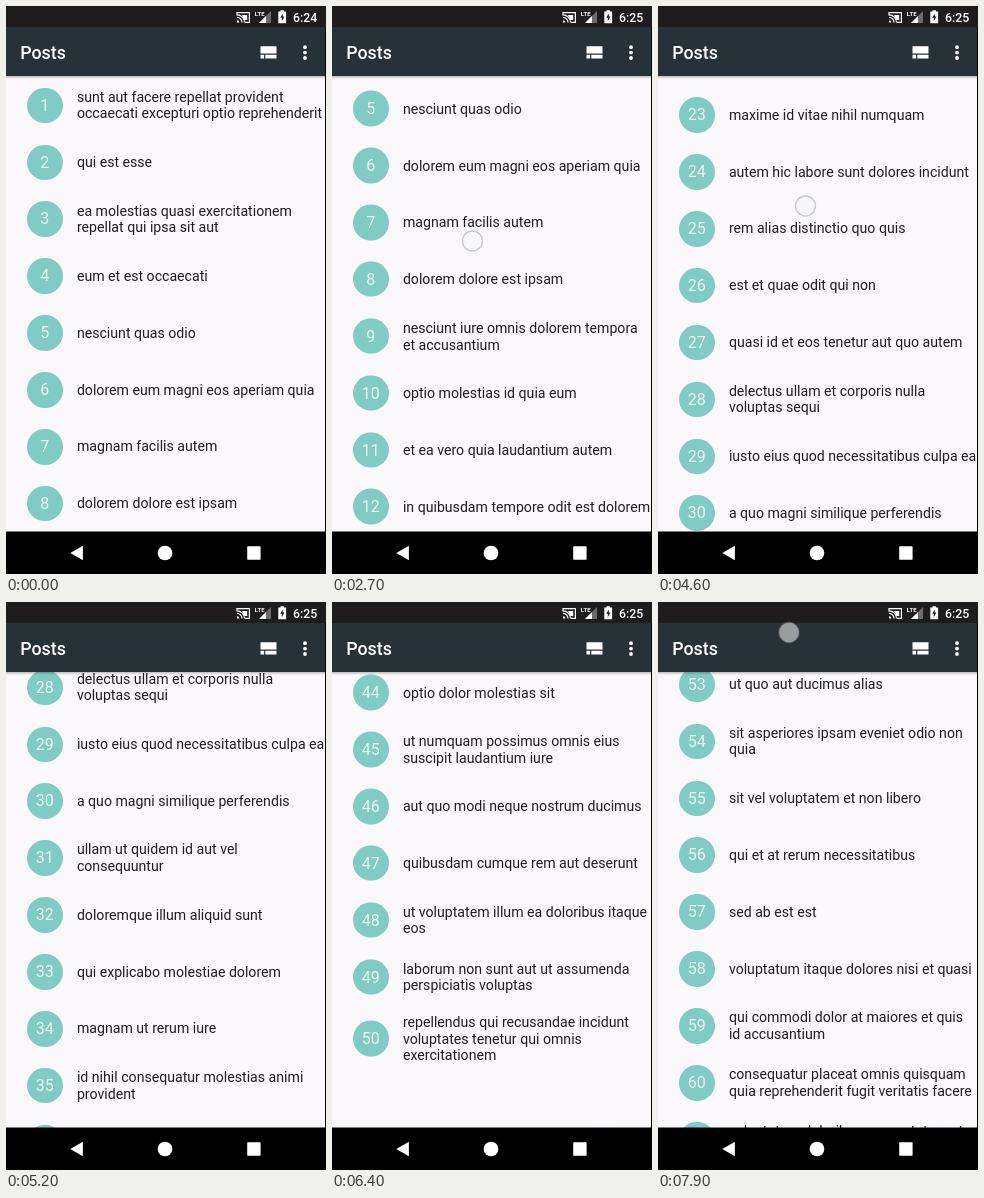
An HTML page that plays this animation: 320 px wide and 568 px high, repeating every 8000 ms.

```html
<!DOCTYPE html>
<html lang="la">
<head>
<meta charset="utf-8">
<title>Posts</title>
<style>
  html, body { margin: 0; width: 100%; height: 100%; overflow: hidden; background: #000; }
  #stage { position: relative; width: 320px; height: 568px; overflow: hidden; font-family: Roboto, sans-serif; }
  #view { position: absolute; top: 70px; width: 319px; height: 455.5px; overflow: hidden; background: #faf8fb; }
  #list { position: absolute; left: 0; top: 1px; width: 320px; }
  .row { position: absolute; left: 0; width: 320px; display: flex; align-items: center; }
  .badge { position: absolute; left: 21px; width: 35.6px; height: 35.6px; border-radius: 50%;
    background: #80cbc4; color: #e8f6f4; font-size: 16px; line-height: 35.6px; text-align: center; }
  .label { position: absolute; left: 70.9px; white-space: pre; font-size: 14.14px; line-height: 16.67px; color: #1e1e1e; }
  svg { position: absolute; left: 0; top: 0; }
</style>
</head>
<body>
<div id="stage">
  <div id="view"><div id="list"></div></div>
  <svg width="320" height="568" viewBox="0 0 320 568">
    <defs>
      <linearGradient id="shade" x1="0" y1="0" x2="0" y2="1">
        <stop offset="0" stop-color="#000" stop-opacity=".25"/>
        <stop offset="1" stop-color="#000" stop-opacity="0"/>
      </linearGradient>
    </defs>
    <path id="spinner" fill="none" stroke="#80cbc4" stroke-width="3.4"/>
    <path id="glow" fill="#000" fill-opacity=".14"/>
    <rect y="70" width="319" height="3" fill="url(#shade)"/>
    <rect width="320" height="21" fill="#1f1c1e"/>
    <rect y="21" width="319" height="49" fill="#263238"/>
    <rect y="525.5" width="320" height="43" fill="#000"/>
    <g fill="#fff">
      <text x="14.2" y="53.2" font-size="17.78" font-weight="500">Posts</text>
      <path d="M254.5 40.3h16v7.3h-16zM254.5 48.8h3.6v3.6h-3.6zM259.3 48.8h11.2v3.6h-11.2z"/>
      <circle cx="299" cy="41.2" r="1.9"/><circle cx="299" cy="46.6" r="1.9"/><circle cx="299" cy="52" r="1.9"/>
      <text id="clock" x="287" y="15.6" font-size="12.3" font-weight="500"></text>
      <g fill="none" stroke="#fff" stroke-width="1.2">
        <path d="M231 9.5V6.6h12.4v9.8H239M231 11.4a5 5 0 0 1 5 5M231 8.9a7.5 7.5 0 0 1 7.5 7.5"/>
      </g>
      <path d="M231 14.2a2.4 2.4 0 0 1 2.4 2.4H231zM236 9h5.2v5h-3z"/>
      <text x="248.8" y="10.2" font-size="6" font-weight="700">LTE</text>
      <path d="M265 5v12H253z" fill-opacity=".35"/>
      <path d="M260 10v7h-7z"/>
      <path d="M272.3 5.6h2.2V4.2h3.4v1.4h2.2v11.6h-7.8z"/>
      <path d="M276.8 7.4l-2.6 4.4h1.6v3.4l2.6-4.6h-1.6z" fill="#1f1c1e"/>
      <path d="M64.3 547l12.6-7.2v14.4z"/>
      <circle cx="159" cy="547" r="7.3"/>
      <rect x="241.2" y="540.3" width="13.4" height="13.4" rx=".6"/>
    </g>
    <circle id="touch" r="10" stroke-width="1.4"/>
  </svg>
</div>
<script>
const titles = `sunt aut facere repellat provident/occaecati excepturi optio reprehenderit
qui est esse
ea molestias quasi exercitationem/repellat qui ipsa sit aut
eum et est occaecati
nesciunt quas odio
dolorem eum magni eos aperiam quia
magnam facilis autem
dolorem dolore est ipsam
nesciunt iure omnis dolorem tempora/et accusantium
optio molestias id quia eum
et ea vero quia laudantium autem
in quibusdam tempore odit est dolorem
dolorum ut in voluptas mollitia et/saepe quo animi
voluptatem eligendi optio
eveniet quod temporibus
sint suscipit perspiciatis velit/dolorum rerum ipsa laboriosam odio
fugit voluptas sed molestias/voluptatem provident
voluptate et itaque vero tempora/molestiae
adipisci placeat illum aut reiciendis qui
doloribus ad provident suscipit at
asperiores ea ipsam voluptatibus modi/minima quia sint
dolor sint quo a velit explicabo quia/nam
maxime id vitae nihil numquam
autem hic labore sunt dolores incidunt
rem alias distinctio quo quis
est et quae odit qui non
quasi id et eos tenetur aut quo autem
delectus ullam et corporis nulla/voluptas sequi
iusto eius quod necessitatibus culpa ea
a quo magni similique perferendis
ullam ut quidem id aut vel/consequuntur
doloremque illum aliquid sunt
qui explicabo molestiae dolorem
magnam ut rerum iure
id nihil consequatur molestias animi/provident
fuga nam accusamus voluptas/reiciendis itaque
provident vel ut sit ratione est
explicabo et eos deleniti nostrum ab id/repellendus
eos dolorem iste accusantium est/eaque quam
enim quo cumque
non est facere
commodi ullam sint et excepturi/error explicabo praesentium/voluptas
eligendi iste nostrum consequuntur/adipisci praesentium sit beatae/perferendis
optio dolor molestias sit
ut numquam possimus omnis eius/suscipit laudantium iure
aut quo modi neque nostrum ducimus
quibusdam cumque rem aut deserunt
ut voluptatem illum ea doloribus itaque/eos
laborum non sunt aut ut assumenda/perspiciatis voluptas
repellendus qui recusandae incidunt/voluptates tenetur qui omnis/exercitationem
soluta aliquam aperiam consequatur/illo quis voluptas
qui enim et consequuntur quia/animi quis voluptate quibusdam
ut quo aut ducimus alias
sit asperiores ipsam eveniet odio non/quia
sit vel voluptatem et non libero
qui et at rerum necessitatibus
sed ab est est
voluptatum itaque dolores nisi et quasi
qui commodi dolor at maiores et quis/id accusantium
consequatur placeat omnis quisquam/quia reprehenderit fugit veritatis facere
voluptatem doloribus consectetur est/ut ducimus
beatae enim quia vel`.split("\n");

const LOOP = 8000, STEP = 100, ROW = 56.89, TALL_ROW = 66.5, LIST_TOP = 71;

// [time, scroll offset]
const scrollSteps = [
  [1200, 0], [1400, 20], [1500, 60], [1600, 110], [1700, 150], [1800, 180], [1900, 200], [2100, 215],
  [2600, 215], [2700, 224.5], [2800, 330], [2900, 450], [3000, 570], [3100, 670], [3200, 760],
  [3300, 835], [3400, 890], [3500, 917.5], [4200, 917.5], [4300, 960], [4400, 1040], [4500, 1040],
  [4600, 1242], [4700, 1330], [4800, 1400], [5000, 1490], [5200, 1550], [5500, 1590], [5600, 1602],
  [5700, 1680], [5800, 1780], [5900, 1884.6], [6100, 2145], [6300, 2378], [6400, 2474.5], [6500, 2522],
  [6600, 2540], [7400, 2540], [7500, 2550], [7600, 2610], [7700, 2725], [7800, 2865], [7900, 3004]
];
const glowSteps = [[3400, 0], [3500, .6], [3600, 1], [3700, .85], [3800, .5], [3900, .2], [4000, 0]];

// The finger stays on the content: y = anchor - scroll
const swipes = [
  { from: 1300, to: 1700, x: 140, anchor: 430, fill: .5 },
  { from: 2600, to: 2900, x: 140.5, anchor: 459.5, fill: .25 },
  { from: 4200, to: 4600, x: 147.5, anchor: 1442, fill: .5 },
  { from: 5600, to: 5900, x: 149.5, anchor: 2090, fill: .55 },
  { from: 7500, to: 7900, x: 131, anchor: 3034.5, fill: .55 }
];
const pages = [
  { rows: 22, until: 3900, spinFrom: 3600 },
  { rows: 50, until: 7300, spinFrom: 6400 },
  { rows: titles.length, until: LOOP, spinFrom: 0 }
];

const $ = id => document.getElementById(id);
const list = $("list"), spinner = $("spinner"), glow = $("glow"), touch = $("touch"), clock = $("clock");

function valueAt(steps, t) {
  const i = steps.findIndex(step => step[0] >= t);
  if (i < 0) return steps[steps.length - 1][1];
  if (i === 0) return steps[0][1];
  const [t0, a] = steps[i - 1], [t1, b] = steps[i];
  return a + (b - a) * (t - t0) / (t1 - t0);
}

function add(parent, className, text = "") {
  const node = document.createElement("div");
  node.className = className;
  node.textContent = text;
  return parent.appendChild(node);
}

let bottom = 0;
const rows = titles.map((title, i) => {
  const lines = title.split("/"), node = add(list, "row");
  const height = lines.length > 2 ? TALL_ROW : ROW;
  node.style.top = bottom + "px";
  node.style.height = height + "px";
  add(node, "badge", i + 1);
  add(node, "label", lines.join("\n"));
  bottom += height;
  return { node, bottom };
});

function arc(cx, cy, r, start, sweep) {
  const point = deg => {
    const a = deg * Math.PI / 180;
    return `${cx + r * Math.cos(a)} ${cy + r * Math.sin(a)}`;
  };
  return `M${point(start)}A${r} ${r} 0 ${sweep > 180 ? 1 : 0} 1 ${point(start + sweep)}`;
}

function draw(t) {
  const scroll = valueAt(scrollSteps, t);
  const page = pages.find(p => t < p.until);
  list.style.transform = `translateY(${-scroll}px)`;
  rows.forEach((row, i) => row.node.style.visibility = i < page.rows ? "visible" : "hidden");
  clock.textContent = t < 700 ? "6:24" : "6:25";

  const spinY = LIST_TOP + rows[page.rows - 1].bottom - scroll + 61.5;
  const spinning = page.rows < titles.length && spinY < 550;
  spinner.setAttribute("d", spinning ? arc(159.5, spinY, 16.3, -18 + .4 * (t - page.spinFrom), 216) : "");

  const lift = valueAt(glowSteps, t), edge = 526 - 17 * lift;
  glow.setAttribute("d", lift ? `M0 526V${edge}Q160 ${edge - 34 * lift} 319 ${edge}V526Z` : "");

  const swipe = swipes.find(s => t >= s.from && t <= s.to);
  touch.style.display = swipe ? "" : "none";
  if (swipe) {
    touch.setAttribute("cx", swipe.x);
    touch.setAttribute("cy", swipe.anchor - scroll);
    touch.setAttribute("fill", `rgba(245,245,245,${swipe.fill})`);
    touch.setAttribute("stroke", "rgba(130,135,140,.4)");
  }
}

const begin = performance.now();
function tick() {
  const elapsed = Math.max(0, performance.now() - begin) % LOOP;
  draw(Math.floor(elapsed / STEP) * STEP);
  requestAnimationFrame(tick);
}
tick();
</script>
</body>
</html>
```
